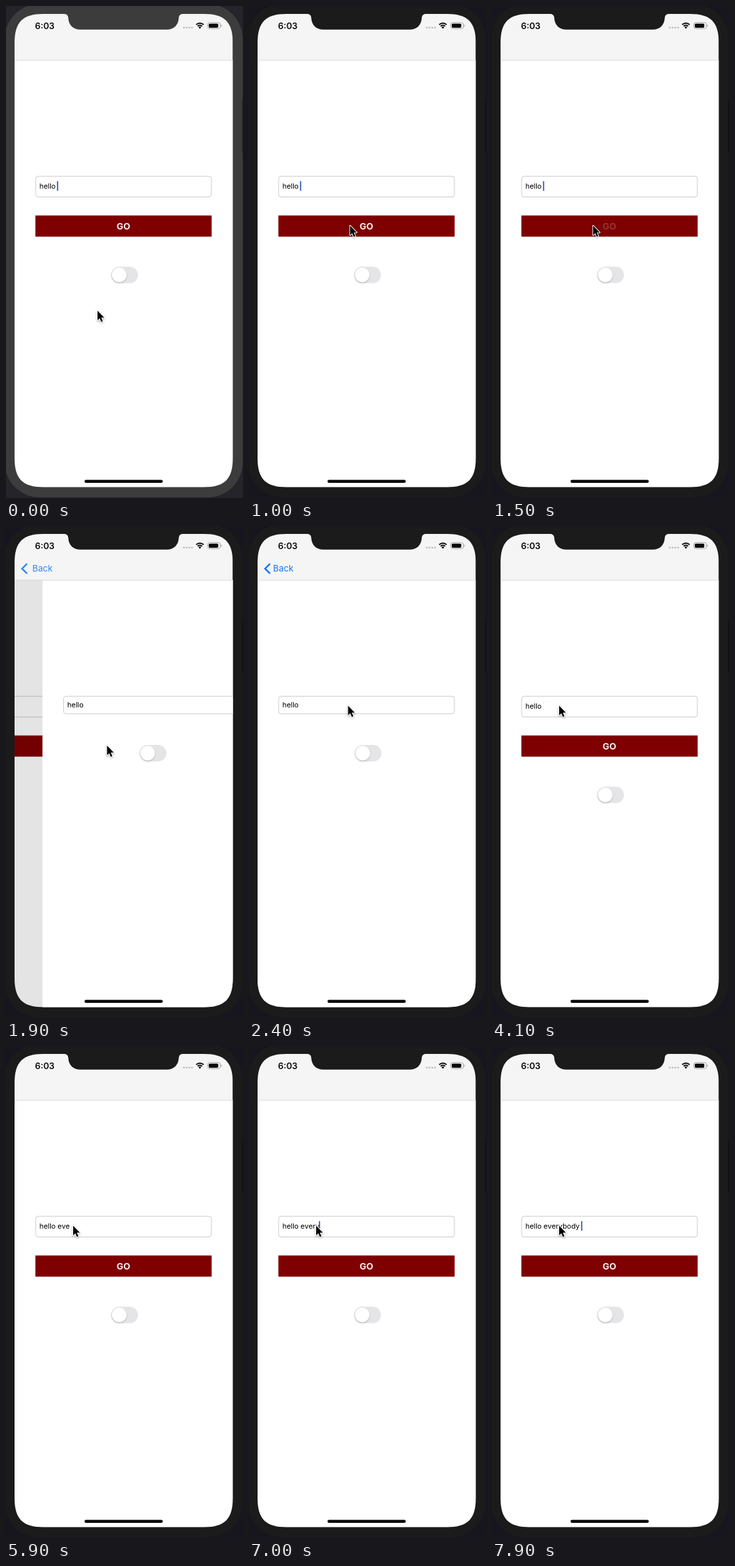
Recreate the animation shown at these times as an HTML page with a canvas. Size 360 px wide and 746 px high, loop 8000 ms.

```html
<!DOCTYPE html>
<html lang="en">
<head>
<meta charset="utf-8">
<title>Phone simulator</title>
<style>
  html, body { margin: 0; width: 100%; height: 100%; overflow: hidden; background: #17161e; }
  canvas { display: block; position: fixed; left: 0; top: 0; width: 360px; height: 746px; }
</style>
</head>
<body>
<canvas id="stage"></canvas>
<script>
const W = 360, H = 746, LOOP = 8000, STEP = 100;
const SCREEN = { x: 13, y: 12, w: 331.5, h: 717.4, corner: 44 };
const FONT = 'Inter, Roboto, sans-serif';

const canvas = document.getElementById('stage');
const ctx = canvas.getContext('2d');
const ratio = window.devicePixelRatio || 1;
canvas.width = W * ratio;
canvas.height = H * ratio;

// Each row: time, x, y of the pointer tip; it rests there until the next row.
const POINTER = [
  [0, 139, 462], [300, 139, 457], [400, 141, 436], [500, 145, 404],
  [600, 149, 370], [700, 152, 345], [800, 153.5, 333],
  [2400, 150.5, 272.5], [2500, 134, 154],
  [2700, 118, 134], [2800, 89, 102], [2900, 63, 62], [3000, 48, 36], [3100, 51, 63.5],
  [3800, 62, 130], [3900, 82, 226], [4000, 96, 259], [4100, 102, 272.5]
];

const TYPED = [
  [0, 'hello '], [4700, 'hello e'], [4900, 'hello ev'], [5200, 'hello eve'],
  [6900, 'hello ever'], [7000, 'hello every'], [7200, 'hello everyb'],
  [7600, 'hello everybo'], [7700, 'hello everybod'],
  [7800, 'hello everybody'], [7900, 'hello everybody ']
];

const CARET = [
  [0, 1], [4000, 0.5], [4100, 0.05], [4200, 0], [4400, 0.5], [4500, 1],
  [5800, 0.5], [5900, 0], [6300, 0.5], [6400, 1]
];

function at(rows, t) {
  let found = rows[0];
  for (const row of rows) if (row[0] <= t) found = row;
  return found;
}

// Critically damped spring from 0 to 1.
function spring(ms) {
  const k = 0.0135 * Math.max(0, ms);
  return 1 - (1 + k) * Math.exp(-k);
}

// 0 shows the first page, 1 the second.
function depthAt(t) {
  if (t < 1635 || t >= 4100) return 0;
  if (t < 2300) return spring(t - 1635);
  return t < 3435 ? 1 : 1 - spring(t - 3435);
}

function roundRect(x, y, w, h, r, fill, stroke) {
  ctx.beginPath();
  ctx.roundRect(x, y, w, h, r);
  if (fill) { ctx.fillStyle = fill; ctx.fill(); }
  if (stroke) { ctx.strokeStyle = stroke; ctx.lineWidth = 1; ctx.stroke(); }
}

// Rectangle with smooth corners that flow into the sides.
function screenPath({ x, y, w, h, corner }) {
  const near = corner * 0.28;
  ctx.beginPath();
  for (const [cx, cy, sx, sy] of [[x, y, 1, 1], [x + w, y, -1, 1], [x + w, y + h, -1, -1], [x, y + h, 1, -1]]) {
    const side = d => [cx, cy + sy * d];
    const flat = d => [cx + sx * d, cy];
    const [from, to] = sx === sy ? [side, flat] : [flat, side];
    ctx.lineTo(...from(corner));
    ctx.bezierCurveTo(...from(near), ...to(near), ...to(corner));
  }
  ctx.closePath();
}

function rect(x, y, w, h, fill) {
  ctx.fillStyle = fill;
  ctx.fillRect(x, y, w, h);
}

function label(text, x, y, size, weight, fill, align = 'left') {
  ctx.font = `${weight} ${size}px ${FONT}`;
  ctx.textAlign = align;
  ctx.fillStyle = fill;
  ctx.fillText(text, x, y);
}

function withAlpha(alpha, draw) {
  ctx.save();
  ctx.globalAlpha = alpha;
  draw();
  ctx.restore();
}

function field(h, text, baseline, caret) {
  roundRect(45, 258.2, 267, h, 4, '#fff', '#cbcbcb');
  label(text, 50.7, baseline, 10.9, 400, '#000');
  if (!caret) return;
  const x = 50.7 + ctx.measureText(text).width;
  withAlpha(caret, () => rect(x - 0.9, 265.6, 1.8, 14.6, '#3058b8'));
}

function toggle(x, y) {
  roundRect(x, y, 41, 25, 12.5, '#e5e5e7');
  ctx.save();
  ctx.shadowColor = 'rgba(0,0,0,.18)';
  ctx.shadowBlur = 3 * ratio;
  ctx.shadowOffsetY = 1.5 * ratio;
  roundRect(x + 1.5, y + 1.5, 22, 22, 11, '#fff');
  ctx.restore();
}

function firstPage(t, depth) {
  ctx.save();
  ctx.translate(-0.3 * SCREEN.w * depth, 0);
  rect(13, 82, SCREEN.w * 1.3, 650, '#fff');
  field(31.4, at(TYPED, t)[1], 277, at(CARET, t)[1]);
  rect(44.6, 317.6, 267.8, 32.1, '#7f0000');
  const pressed = t >= 1300 && t < 1700;
  withAlpha(pressed ? 0.2 : 0.94, () => label('GO', 178.3, 339.3, 13.6, 700, '#fff', 'center'));
  toggle(159.5, 395.3);
  ctx.restore();
  withAlpha(0.12 * depth, () => rect(13, 82, SCREEN.w, 650, '#000'));
}

function secondPage(depth) {
  ctx.save();
  ctx.translate(SCREEN.w * (1 - depth), 0);
  rect(13, 82, SCREEN.w, 650, '#fff');
  field(26.6, 'hello', 274.8, 0);
  toggle(160.3, 332);
  ctx.restore();
}

function backButton(t, depth) {
  const pressed = t >= 3300 && t < 4100;
  withAlpha(depth * (pressed ? 0.32 : 1), () => {
    ctx.beginPath();
    ctx.moveTo(32, 57.2);
    ctx.lineTo(24.4, 64.7);
    ctx.lineTo(32, 72.2);
    ctx.strokeStyle = '#1479ee';
    ctx.lineWidth = 2.5;
    ctx.stroke();
    label('Back', 36.6 + 27 * (1 - depth), 69.3, 13.2, 400, '#1479ee');
  });
}

function statusBar() {
  label('6:03', 44, 34.6, 13.2, 600, '#0a0a0a');
  for (let i = 0; i < 4; i++) roundRect(268.8 + i * 4.1, 31.4, 2.8, 2.8, 1.4, '#bdbdbd');

  ctx.strokeStyle = '#0a0a0a';
  ctx.lineWidth = 2;
  for (const r of [4.7, 8]) {
    ctx.beginPath();
    ctx.arc(294.5, 34, r, -Math.PI * 0.75, -Math.PI * 0.25);
    ctx.stroke();
  }
  ctx.beginPath();
  ctx.moveTo(294.5, 34.4);
  ctx.arc(294.5, 34.4, 3, -Math.PI * 0.75, -Math.PI * 0.25);
  ctx.fillStyle = '#0a0a0a';
  ctx.fill();

  roundRect(306.5, 25.2, 19, 9.2, 2.8, null, '#a3a3a3');
  roundRect(308, 26.7, 14.4, 6.2, 1.6, '#0a0a0a');
  roundRect(326.6, 28.3, 1.2, 3, 0.6, '#a3a3a3');
}

function notch(fill) {
  ctx.beginPath();
  ctx.moveTo(88, 11);
  ctx.lineTo(88, 12);
  ctx.quadraticCurveTo(94, 12, 94.5, 17.5);
  ctx.bezierCurveTo(95, 29, 102, 35.7, 113, 35.7);
  ctx.lineTo(244, 35.7);
  ctx.bezierCurveTo(255, 35.7, 262, 29, 262.5, 17.5);
  ctx.quadraticCurveTo(263, 12, 269, 12);
  ctx.lineTo(269, 11);
  ctx.fillStyle = fill;
  ctx.fill();
}

function pointer(x, y) {
  const outline = [[0, 0], [0, 14.6], [3.3, 11.5], [5.7, 17], [8, 16], [5.7, 10.6], [10.2, 10.4]];
  ctx.save();
  ctx.translate(x, y);
  ctx.beginPath();
  outline.forEach(p => ctx.lineTo(...p));
  ctx.closePath();
  ctx.lineJoin = 'round';
  ctx.lineWidth = 2;
  ctx.strokeStyle = '#fff';
  ctx.shadowColor = 'rgba(0,0,0,.35)';
  ctx.shadowBlur = 3 * ratio;
  ctx.shadowOffsetY = 1.2 * ratio;
  ctx.stroke();
  ctx.shadowColor = 'transparent';
  ctx.fillStyle = '#000';
  ctx.fill();
  ctx.restore();
}

function draw(t) {
  const focused = t >= 1000;
  const bezel = focused ? '#1b1b1b' : '#3c3c3c';
  const depth = depthAt(t);
  ctx.setTransform(ratio, 0, 0, ratio, 0, 0);
  rect(0, 0, W, H, focused ? '#17161e' : '#25242b');
  roundRect(-2, -3, 361.5, 748, 53, bezel);
  rect(358.6, 141, 1.4, 82, focused ? '#111' : '#242424');

  ctx.save();
  screenPath(SCREEN);
  ctx.clip();
  firstPage(t, depth);
  if (depth > 0) secondPage(depth);
  rect(13, 12, SCREEN.w, 70, '#f5f5f5');
  rect(13, 81.7, SCREEN.w, 0.9, '#d6d6d6');
  if (depth > 0) backButton(t, depth);
  statusBar();
  roundRect(119.3, 718.6, 118.8, 4.4, 2.2, '#000');
  ctx.restore();

  notch(bezel);
  const [, x, y] = at(POINTER, t);
  pointer(x, y);
}

function tick() {
  const t = performance.now() % LOOP;
  draw(Math.floor(t / STEP) * STEP);
  requestAnimationFrame(tick);
}
tick();
</script>
</body>
</html>
```
